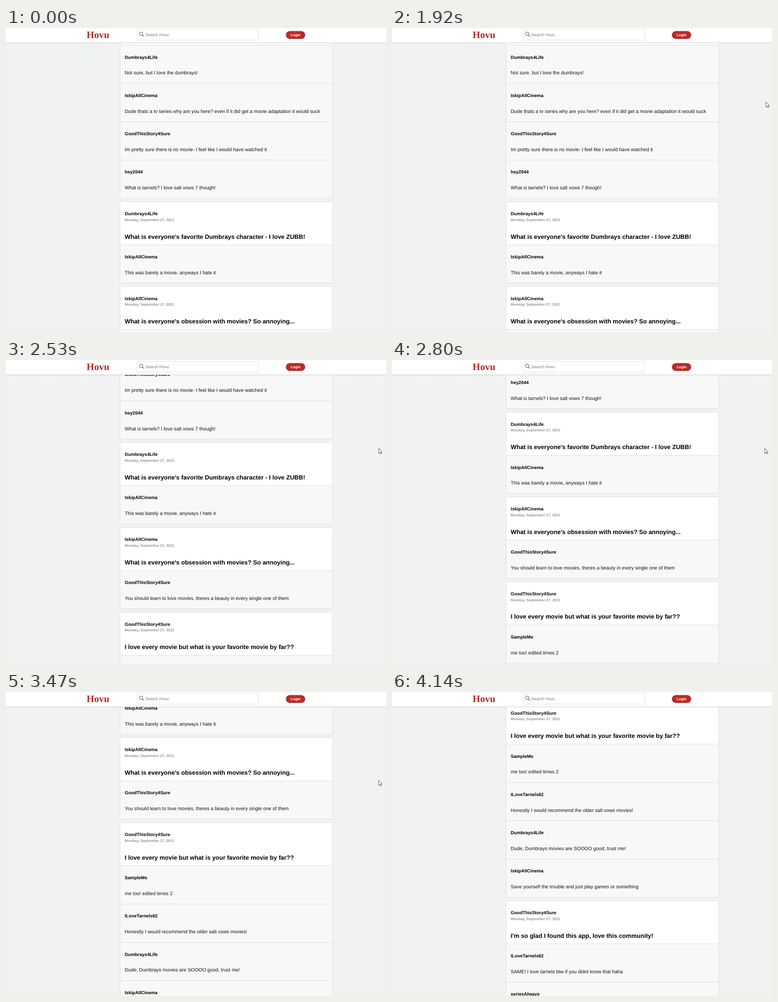
Write an HTML page that moves like this. It is 837 by 669 pixels and loops after 5400 ms.

```html
<!DOCTYPE html>
<html lang="en">
<head>
<meta charset="utf-8">
<title>Forum feed</title>
<style>
html, body { margin: 0; width: 100%; height: 100%; overflow: hidden; background: #f1f2f2; }
svg { display: block; width: 837px; height: 669px; }
text { font-family: "Liberation Sans", Arial, sans-serif; white-space: pre; text-rendering: geometricPrecision; }
.name { font-weight: bold; font-size: 15px; }
.date { font-weight: bold; font-size: 12px; fill: #939598; }
.ask { font-weight: bold; font-size: 20px; }
.reply { font-size: 16px; fill: #111; }
.logo { font: bold 32px "Liberation Serif", "Times New Roman", serif; fill: #b92b27; }
.hint { font-size: 13.33px; fill: #777; }
.login { font-weight: bold; font-size: 12px; fill: #fff; text-anchor: middle; }
</style>
</head>
<body>
<svg viewBox="0 0 837 669">
  <defs>
    <linearGradient id="shade" x2="0" y2="1">
      <stop offset="0" stop-color="#000" stop-opacity=".13"/>
      <stop offset="1" stop-color="#000" stop-opacity="0"/>
    </linearGradient>
  </defs>
  <rect width="837" height="669" fill="#f1f2f2"/>
  <g transform="scale(.669)">
    <g id="feed"></g>
    <rect y="48" width="1252" height="4" fill="url(#shade)"/>
    <rect width="1252" height="48" fill="#fff"/>
    <rect y="47.5" width="1252" height="1.5" fill="#dee0e1"/>
    <text class="logo" x="265.5" y="33.5">Hovu</text>
    <rect x="431.5" y="5" width="400" height="34.5" rx="3" fill="#fff" stroke="#dcdee0" stroke-width="1.5"/>
    <g fill="none" stroke="#8e9092" stroke-width="2.6">
      <circle cx="445" cy="19" r="5.4"/>
      <path d="M449 23l5 5" stroke-width="3.2"/>
    </g>
    <text class="hint" x="459" y="27">Search Hovu</text>
    <rect x="921.5" y="10" width="63.5" height="26" rx="13" fill="#b92b27"/>
    <text class="login" x="953.4" y="27">Login</text>
  </g>
  <path id="cursor" d="M0 0V11.2L2.5 8.9L4.1 12.4L5.9 11.6L4.3 8.1H7.6Z" fill="#fff" stroke="#222" stroke-width=".8"/>
</svg>
<script>
const NS = 'http://www.w3.org/2000/svg';
const feed = document.getElementById('feed');
const cursor = document.getElementById('cursor');

const LOOP = 5400, NOTCH = 100;
const TOP = -85.5, LEFT = 375.5, WIDTH = 700, ASK_H = 142, REPLY_H = 126, GAP = 11;
const EDGE = '#dadcdd';

const fan = 'Dumbrays4Life', grump = 'IskipAllCinema', buff = 'GoodThisStory4Sure', pal = 'ILoveTarnels62';

// author, question, then [author, reply] pairs
const posts = [
  ['', '',
    [fan, 'Not sure, but I love the dumbrays!'],
    [grump, 'Dude thats a tv series why are you here? even if it did get a movie adaptation it would suck'],
    [buff, 'Im pretty sure there is no movie- I feel like I would have watched it'],
    ['hey2044', 'What is tarnels? I love salt vows 7 though!']],
  [fan, "What is everyone's favorite Dumbrays character - I love ZUBB!",
    [grump, 'This was barely a movie, anyways I hate it']],
  [grump, "What is everyone's obsession with movies? So annoying...",
    [buff, 'You should learn to love movies, theres a beauty in every single one of them']],
  [buff, 'I love every movie but what is your favorite movie by far??',
    ['SampleMe', 'me too! edited times 2'],
    [pal, 'Honestly I would recommend the older salt vows movies!'],
    [fan, 'Dude, Dumbrays movies are SOOOO good, trust me!'],
    [grump, 'Save yourself the trouble and just play games or something']],
  [buff, "I'm so glad I found this app, love this community!",
    [pal, 'SAME! I love tarnels btw if you didnt know that haha'],
    ['seriesAlways', '']]
];

function add(tag, attrs, content) {
  const el = document.createElementNS(NS, tag);
  for (const k in attrs) el.setAttribute(k, attrs[k]);
  if (content) el.textContent = content;
  feed.appendChild(el);
}

function label(cls, y, content) {
  if (content) add('text', { class: cls, x: 391, y }, content);
}

function box(y, height, fill, stroke) {
  add('rect', { x: LEFT, y, width: WIDTH, height, rx: 3, fill, stroke, 'stroke-width': 1.4 });
}

function buildFeed() {
  let top = TOP;
  for (const [author, question, ...replies] of posts) {
    const height = ASK_H + replies.length * REPLY_H;
    box(top, height, '#f8f8f8', 'none');
    box(top, ASK_H, '#fff', 'none');
    label('name', top + 44.5, author);
    label('date', top + 63.5, author && 'Monday, September 27, 2021');
    label('ask', top + 121.5, question);
    replies.forEach(([who, what], i) => {
      const y = top + ASK_H + i * REPLY_H;
      add('path', { d: `M${LEFT} ${y}h${WIDTH}`, stroke: EDGE, 'stroke-width': 1.5 });
      label('name', y + 44.5, who);
      label('reply', y + 96.5, what);
    });
    box(top, height, 'none', EDGE);
    top += height + GAP;
  }
}

// wheel clicks, each a hard jump
const clicks = [1990, 2130, 2260, 2800, 2870, 3070, 3470, 3540, 3670, 3870, 3940];

// moments at which the pointer is redrawn
const ticks = [1710, 1780, 1850, 1920, 1990, 2060, 2130, 2200, 2260, 2330, 2530, 3870, 3940, 4070, 4140];

// time, x, y
const route = [
  [1710, 827.5, 138], [2130, 820, 188], [2330, 820.8, 193.5],
  [2530, 821, 194.5], [3870, 821, 194.5], [4140, 834, 186]
];

function pointerAt(time) {
  const t = ticks.filter(k => k <= time).pop();
  const i = route.findIndex(p => p[0] > t);
  if (t === undefined || i < 1) return null;
  const [t0, x0, y0] = route[i - 1], [t1, x1, y1] = route[i];
  const k = (t - t0) / (t1 - t0);
  return [x0 + (x1 - x0) * k, y0 + (y1 - y0) * k];
}

function draw(time) {
  const scroll = clicks.filter(c => c <= time).length * NOTCH;
  feed.setAttribute('transform', `translate(0 ${-scroll})`);
  const p = pointerAt(time);
  cursor.setAttribute('visibility', p ? 'visible' : 'hidden');
  if (p) cursor.setAttribute('transform', `translate(${p[0]} ${p[1]})`);
}

buildFeed();
const start = performance.now();
function loop() {
  draw((performance.now() - start) % LOOP);
  requestAnimationFrame(loop);
}
draw(0);
requestAnimationFrame(loop);
</script>
</body>
</html>
```
